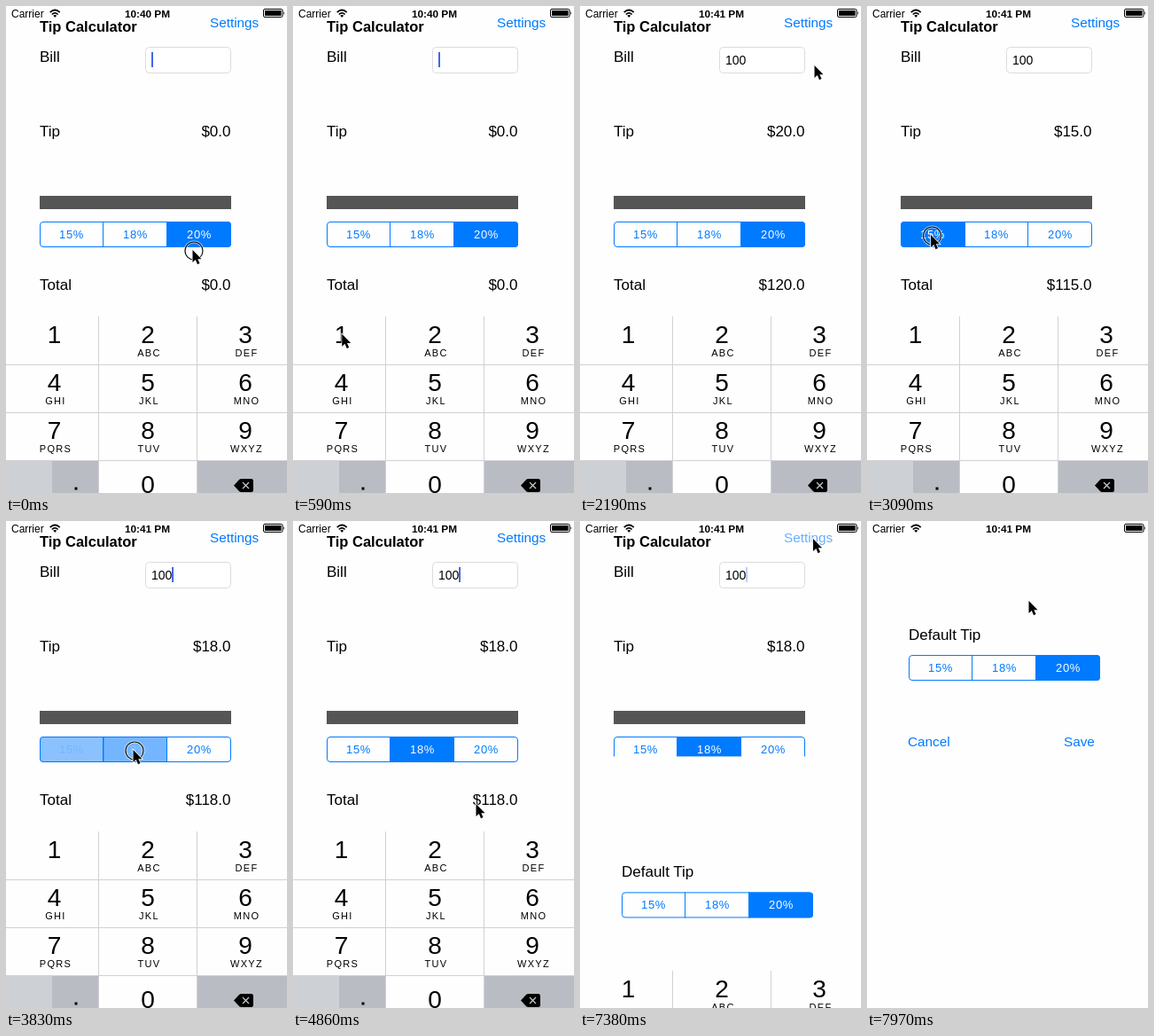
Write an HTML page that moves like this. It is 317 by 549 pixels and loops after 8000 ms.

```html
<!DOCTYPE html>
<html lang="en">
<head>
<meta charset="utf-8">
<title>Tip calculator</title>
<style>
  html, body { margin: 0; width: 100%; height: 100%; overflow: hidden; background: #fefefe; }
  svg { display: block; width: 317px; height: 549px; font-family: "Liberation Sans", Arial, sans-serif; }
  text { white-space: pre; }
  .body { font-size: 17px; }
  .link { font-size: 15.3px; fill: #007aff; }
  .digit { font-size: 28px; text-anchor: middle; }
  .letters { font-size: 11px; letter-spacing: 1.3px; text-anchor: middle; }
  .seg { font-size: 13px; letter-spacing: .6px; text-anchor: middle; }
  .end { text-anchor: end; }
</style>
</head>
<body>
<svg viewBox="0 0 317 549">
  <defs><clipPath id="round"><rect width="216" height="29" rx="4"/></clipPath></defs>
  <rect width="317" height="549" fill="#fefefe"/>

  <g id="main">
    <text x="38" y="28.5" font-size="16.5" font-weight="bold">Tip Calculator</text>
    <text id="settings" class="link" x="230" y="24">Settings</text>
    <text class="body" x="38" y="63">Bill</text>
    <rect x="157.5" y="46.5" width="96" height="29" rx="4" fill="#fff" stroke="#dcdcdc"/>
    <text id="bill" x="164" y="66" font-size="14"></text>
    <rect id="caret" y="52" width="2" height="17" fill="#4468e4"/>
    <text class="body" x="38" y="147">Tip</text>
    <text id="tip" class="body end" x="253.5" y="147"></text>
    <rect x="38" y="214" width="216" height="15" fill="#555"/>
    <g id="rates" transform="translate(38 243)"></g>
    <text class="body" x="38" y="320">Total</text>
    <text id="total" class="body end" x="253.5" y="320"></text>
  </g>

  <g id="modal">
    <rect y="-2" width="317" height="580" fill="#fefefe"/>
    <text class="body" x="47" y="134">Default Tip</text>
    <g id="defaults" transform="translate(47 151)"></g>
    <text class="link" x="46" y="254">Cancel</text>
    <text class="link" x="222" y="254">Save</text>
  </g>

  <g id="keyboard">
    <rect y="350" width="317" height="230" fill="#fefefe"/>
    <rect id="keyOne" y="350" width="104" height="54" fill="#b9bdc3"/>
    <rect id="keyZero" x="105" y="513" width="110" height="54" fill="#b9bdc3"/>
    <rect y="513" width="52" height="54" fill="#cdd0d5"/>
    <path d="M52 513h53v54h-53zM215 513h102v54h-102z" fill="#b9bdc3"/>
    <path d="M104.5 350V567M215.5 350V567M0 404.5H317M0 458.5H317M0 512.5H317" stroke="#d0d1d3" fill="none"/>
    <g id="keys"></g>
    <rect x="77.5" y="542.5" width="3" height="3"/>
    <path d="M257 540.5L263 534Q264 533 265.500 533H276.500Q279 533 279 535.500V545.500Q279 548 276.500 548H265.500Q264 548 263 547Z"/>
    <path d="M267 537l7 7m0-7l-7 7" stroke="#c4c7cc" stroke-width="1.300"/>
  </g>

  <g id="status">
    <text x="6" y="12.5" font-size="12">Carrier</text>
    <g fill="none" stroke="#000" stroke-width="1.700">
      <path d="M49.700 7.200Q55.200 1.800 60.700 7.200M51.800 9.500Q55.200 6.200 58.600 9.500"/>
    </g>
    <path d="M53.200 10.800Q55.200 9 57.200 10.800L55.200 13Z"/>
    <text id="clock" x="159.500" y="12.500" font-size="11.800" font-weight="bold" text-anchor="middle"></text>
    <rect x="290.500" y="3.500" width="21.500" height="9" rx="1.500" fill="none" stroke="#000"/>
    <rect x="292" y="5" width="18.500" height="6"/>
    <path d="M313 6q1.800 2 0 4z"/>
  </g>

  <g id="pointer">
    <g id="ring" fill="none">
      <circle cx="1.500" cy="1" r="10" stroke="#fff" stroke-width="3" opacity=".6"/>
      <circle cx="1.500" cy="1" r="10" stroke="#111" stroke-width="1.200"/>
    </g>
    <path d="M0 0V14L3.300 11L5.500 16.200L8 15.100L5.800 10.200H10Z" stroke="#fff" stroke-width="1.500" paint-order="stroke"/>
  </g>
</svg>

<script>
const LOOP = 8000;
const $ = id => document.getElementById(id);
const clamp = v => Math.max(0, Math.min(1, v));
const BLUE = '#007aff';

function add(parent, tag, attrs, text = '') {
  const el = document.createElementNS('http://www.w3.org/2000/svg', tag);
  for (const name in attrs) el.setAttribute(name, attrs[name]);
  el.textContent = text;
  parent.append(el);
  return el;
}

// Segmented control; returns the three highlight layers.
function segments(parent) {
  const labels = ['15%', '18%', '20%'];
  const label = (box, i, fill) =>
    add(box, 'text', { class: 'seg', x: 36 + 72 * i, y: 19, fill }, labels[i]);
  labels.forEach((_, i) => label(parent, i, BLUE));
  const clip = add(parent, 'g', { 'clip-path': 'url(#round)' });
  const layers = labels.map((_, i) => {
    const layer = add(clip, 'g', {});
    add(layer, 'rect', { x: 72 * i - (i ? 1 : 0), width: 73, height: 29, fill: BLUE });
    label(layer, i, '#fff');
    return layer;
  });
  add(parent, 'rect', { x: .5, y: .5, width: 215, height: 28, rx: 3.5, fill: 'none', stroke: BLUE });
  add(parent, 'path', { d: 'M71.5 0V29M143.5 0V29', stroke: BLUE });
  return layers;
}

const rates = segments($('rates'));
segments($('defaults')).forEach((layer, i) => layer.setAttribute('opacity', i === 2 ? 1 : 0));

['', 'ABC', 'DEF', 'GHI', 'JKL', 'MNO', 'PQRS', 'TUV', 'WXYZ'].forEach((letters, i) => {
  const x = [54.5, 160, 270][i % 3], y = 380 + 54 * Math.floor(i / 3);
  add($('keys'), 'text', { class: 'digit', x, y }, i + 1);
  add($('keys'), 'text', { class: 'letters', x: x + 1.5, y: y + 15 }, letters);
});
add($('keys'), 'text', { class: 'digit', x: 160, y: 549 }, '0');

const ticks = [[0, 0], [1, 140], [8, 1170], [16, 2340], [24, 3540], [30, 4420], [42, 6200], [50, 7380], [54, 7970], [55, 8120]];
const starts = [];
ticks.slice(1).forEach(([n, ms], i) => {
  const [n0, ms0] = ticks[i];
  for (let k = n0; k < n; k++) starts.push(Math.round((ms0 + (ms - ms0) * (k - n0) / (n - n0)) / 10) * 10);
});
const hold = t => starts.findLast(s => s <= t);

// Pointer stops: [ms, x, y]
const path = [
  [0, 210.5, 275], [140, 205, 280], [590, 55, 370], [730, 55, 370], [1170, 166, 532], [1610, 166, 532],
  [2050, 262, 84], [2190, 264.5, 67], [2340, 236, 100], [2790, 85, 250], [2940, 72, 258], [3240, 72, 258],
  [3690, 143.5, 258], [3980, 143.5, 258], [4420, 205, 302], [4570, 205, 302], [4870, 208, 336],
  [5460, 248, 6], [5760, 254, 8], [6060, 264.5, 10], [6800, 264.5, 10], [6940, 263, 20],
  [7380, 263, 20], [7970, 182.5, 90]
];
const clicks = [[0, 140], [590, 800], [1160, 1300], [1450, 1600], [2930, 3100], [3680, 3850], [7080, 7240]];
const within = (t, [from, to]) => t >= from && t < to;

function pointerAt(t) {
  const i = path.findIndex(p => p[0] > t);
  if (i < 0) return path.at(-1).slice(1);
  const [t0, x0, y0] = path[i - 1], [t1, x1, y1] = path[i];
  const p = (t - t0) / (t1 - t0), e = p * p * (3 - 2 * p);
  return [x0 + (x1 - x0) * e, y0 + (y1 - y0) * e];
}

// Critically damped slide, 0 to 1
function spring(ms) {
  const x = Math.max(0, ms) * .0183;
  return 1 - (1 + x) * Math.exp(-x);
}

const move = (id, x, y) => $(id).setAttribute('transform', `translate(${x} ${y})`);
const show = (id, opacity) => $(id).setAttribute('opacity', Number(opacity));
const money = v => '$' + v.toFixed(1);

function render(t) {
  const bill = t < 730 ? '' : t < 1310 ? '1' : t < 1600 ? '10' : '100';
  const rate = t < 2940 ? .2 : t < 3820 ? .15 : .18;
  $('bill').textContent = bill;
  $('tip').textContent = money(bill * rate);
  $('total').textContent = money(bill * (1 + rate));
  $('clock').textContent = t < 1900 ? '10:40 PM' : '10:41 PM';

  $('caret').setAttribute('x', 164 + bill.length * 7.785 - (bill ? .3 : 0));
  show('caret', t < 1700 ? 1 : clamp(.8 - 1.1 * Math.cos((t - 6200) / 1000 * 2 * Math.PI)));

  const to15 = clamp((t - 2890) / 200), to18 = clamp((t - 3720) / 200);
  [to15 - to18, to18, 1 - to15].forEach((p, i) => rates[i].setAttribute('opacity', p));

  show('keyOne', within(t, clicks[1]));
  show('keyZero', within(t, clicks[2]) || within(t, clicks[3]));
  show('settings', t < 7080 ? 1 : t < 7240 ? .3 : .6);
  move('keyboard', 0, 214 * spring(t - 7238));
  move('modal', 0, 562 * (1 - spring(t - 7284)));

  move('pointer', ...pointerAt(t));
  show('ring', clicks.some(c => within(t, c)));
}

const begin = performance.now();
function tick() {
  render(hold((performance.now() - begin) % LOOP));
  requestAnimationFrame(tick);
}
tick();
</script>
</body>
</html>
```
